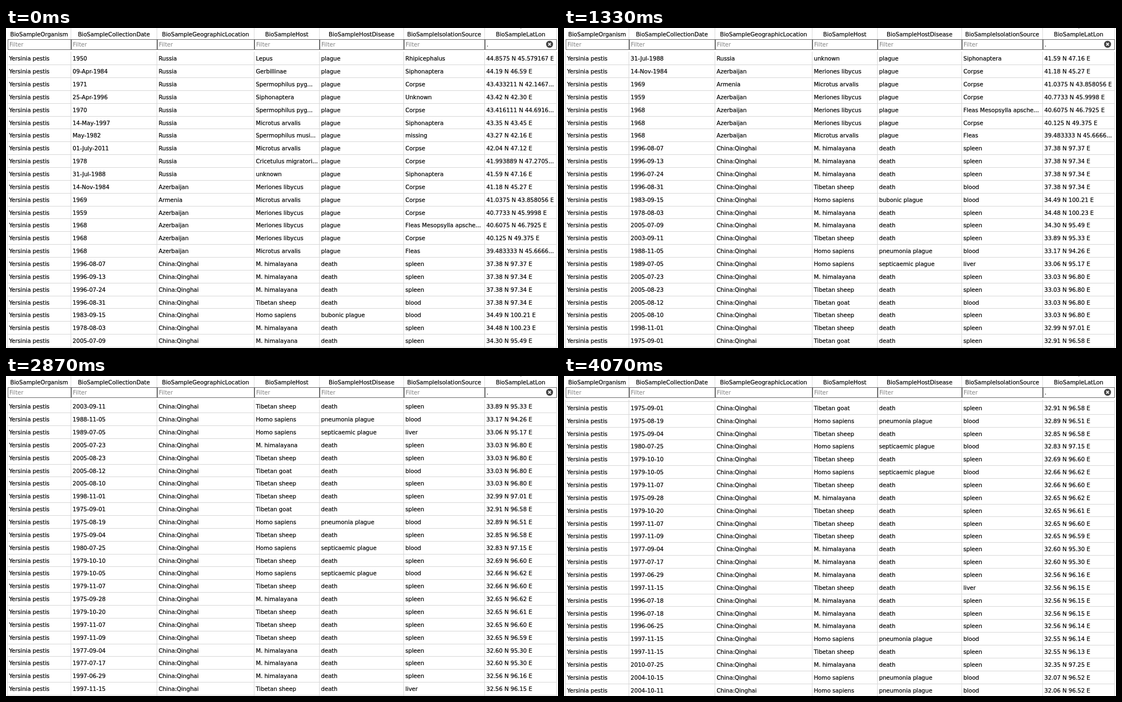
Write an HTML page that moves like this. It is 982 by 570 pixels and loops after 4.27 s.

```html
<!DOCTYPE html>
<html lang="en">
<head>
<meta charset="utf-8">
<title>Sample table</title>
<style>
  html, body { margin: 0; width: 100%; height: 100%; overflow: hidden; background: #fff; }
  body { position: relative; color: #000; white-space: pre; -webkit-text-stroke: 0.2px;
    font: 11.25px "DejaVu Sans Condensed", "Noto Sans", sans-serif; }
  div, span, svg { position: absolute; box-sizing: border-box; }
  .head { top: 0; height: 20px; line-height: 24px; text-align: center; border-right: 1px solid #dcdcdc; }
  .filter { top: 20px; height: 19px; line-height: 18px; padding-left: 2px; color: #808080;
    border: 1px solid #6e6e6e; -webkit-text-stroke: 0; }
  .filter.used { color: #000; }
  .rule { top: 42px; bottom: 0; width: 1px; background: #d8d8d8; }
  #list { top: 43px; left: 0; width: 982px; bottom: 0; overflow: hidden; }
  .row { left: 3px; width: 977px; height: 22.857px; line-height: 23px; border-bottom: 1px solid #d8d8d8; }
</style>
</head>
<body>
<div id="list"></div>
<svg width="982" height="40" style="left:0;top:0">
  <path d="M913 -2l3 3 3-3" fill="none" stroke="#999"/>
  <circle cx="967" cy="29" r="6.2" fill="#444"/>
  <path d="M964.7 26.7l4.6 4.6m0-4.6l-4.6 4.6" stroke="#fff" stroke-width="1.7"/>
</svg>
<script>
const LOOP = 4270, PITCH = 22.857;
const edges = [2, 115, 268, 441, 557, 707, 851, 979];
const titles = ['Organism', 'CollectionDate', 'GeographicLocation', 'Host', 'HostDisease', 'IsolationSource', 'LatLon'];

const western = `1950|Russia|Lepus|Rhipicephalus|44.8575 N 45.579167 E
09-Apr-1984|Russia|Gerbillinae|Siphonaptera|44.19 N 46.59 E
1971|Russia|Spermophilus pyg...|Corpse|43.433211 N 42.1467...
25-Apr-1996|Russia|Siphonaptera|Unknown|43.42 N 42.30 E
1970|Russia|Spermophilus pyg...|Corpse|43.416111 N 44.6916...
14-May-1997|Russia|Microtus arvalis|Siphonaptera|43.35 N 43.45 E
May-1982|Russia|Spermophilus musi...|missing|43.27 N 42.16 E
01-July-2011|Russia|Microtus arvalis|Corpse|42.04 N 47.12 E
1978|Russia|Cricetulus migratori...|Corpse|41.993889 N 47.2705...
31-Jul-1988|Russia|unknown|Siphonaptera|41.59 N 47.16 E
14-Nov-1984|Azerbaijan|Meriones libycus|Corpse|41.18 N 45.27 E
1969|Armenia|Microtus arvalis|Corpse|41.0375 N 43.858056 E
1959|Azerbaijan|Meriones libycus|Corpse|40.7733 N 45.9998 E
1968|Azerbaijan|Meriones libycus|Fleas Mesopsylla apsche...|40.6075 N 46.7925 E
1968|Azerbaijan|Meriones libycus|Corpse|40.125 N 49.375 E
1968|Azerbaijan|Microtus arvalis|Fleas|39.483333 N 45.6666...`;

// date, host + disease + tissue codes, latitude, longitude
const qinghai = `1996-08-07 Mds 37.38 97.37
1996-09-13 Mds 37.38 97.34
1996-07-24 Mds 37.38 97.34
1996-08-31 Sdb 37.38 97.34
1983-09-15 Hbb 34.49 100.21
1978-08-03 Mds 34.48 100.23
2005-07-09 Mds 34.30 95.49
2003-09-11 Sds 33.89 95.33
1988-11-05 Hpb 33.17 94.26
1989-07-05 Hsl 33.06 95.17
2005-07-23 Mds 33.03 96.80
2005-08-23 Sds 33.03 96.80
2005-08-12 Gdb 33.03 96.80
2005-08-10 Sds 33.03 96.80
1998-11-01 Sds 32.99 97.01
1975-09-01 Gds 32.91 96.58
1975-08-19 Hpb 32.89 96.51
1975-09-04 Sds 32.85 96.58
1980-07-25 Hsb 32.83 97.15
1979-10-10 Sds 32.69 96.60
1979-10-05 Hsb 32.66 96.62
1979-11-07 Sds 32.66 96.60
1975-09-28 Mds 32.65 96.62
1979-10-20 Sds 32.65 96.61
1997-11-07 Sds 32.65 96.60
1997-11-09 Sds 32.65 96.59
1977-09-04 Mds 32.60 95.30
1977-07-17 Mds 32.60 95.30
1997-06-29 Mds 32.56 96.16
1997-11-15 Sdl 32.56 96.15
1996-07-18 Mds 32.56 96.15
1996-07-18 Mds 32.56 96.15
1996-06-25 Mds 32.56 96.14
1997-11-15 Hpb 32.55 96.14
1997-11-15 Sds 32.55 96.13
2010-07-25 Mds 32.35 97.25
2004-10-15 Hpb 32.07 96.52
2004-10-11 Hpb 32.06 96.52`;

const hosts = { M: 'M. himalayana', S: 'Tibetan sheep', G: 'Tibetan goat', H: 'Homo sapiens' };
const diseases = { d: 'death', b: 'bubonic plague', p: 'pneumonia plague', s: 'septicaemic plague' };
const tissues = { s: 'spleen', b: 'blood', l: 'liver' };

const rows = [
  ...western.split('\n').map(line => {
    const [date, place, host, source, position] = line.split('|');
    return [date, place, host, 'plague', source, position];
  }),
  ...qinghai.split('\n').map(line => {
    const [date, [host, disease, tissue], lat, lon] = line.split(' ');
    return [date, 'China:Qinghai', hosts[host], diseases[disease], tissues[tissue], `${lat} N ${lon} E`];
  })
].map(cells => ['Yersinia pestis', ...cells]);

// [time, first visible row]; the last stop is the end of the scroll range
const stops = [[0, 0], [470, 1], [530, 2], [730, 3], [870, 4], [930, 5], [1070, 6], [1130, 7],
  [1270, 8], [1330, 9], [1470, 10], [1530, 11], [1670, 13], [1730, 14], [1870, 15], [1930, 16],
  [2130, 17], [2270, 18], [2400, 19], [2530, 20], [2670, 21], [2800, 22], [2870, 23], [3070, 24],
  [3200, 25], [3330, 26], [3470, 28], [3600, 29], [3870, 30], [4070, 31]];
const END_GAP = 2.5;

const list = document.getElementById('list');

function add(cls, left, width, text = '') {
  const el = document.createElement('div');
  el.className = cls;
  el.style.left = left + 'px';
  if (width) el.style.width = width + 'px';
  el.textContent = text;
  list.before(el);
}

titles.forEach((title, i) => {
  const left = edges[i], width = edges[i + 1] - left, last = i === titles.length - 1;
  add('head', left + 1, width, 'BioSample' + title);
  add(last ? 'filter used' : 'filter', left + 1, width, last ? '.' : 'Filter');
});
edges.forEach(x => add('rule', x, 0));

function show(first) {
  const shift = 0.3 + (first === 31 ? END_GAP : 0);
  let html = '';
  for (let i = -1; i < 23; i++) {
    const cells = (rows[first + i] || []).map((text, c) =>
      `<span style="left:${edges[c] + 0.5}px">${text}</span>`).join('');
    html += `<div class="row" style="top:${i * PITCH + shift}px">${cells}</div>`;
  }
  list.innerHTML = html;
}

let shown = -1;
function tick() {
  const t = performance.now() % LOOP;
  const first = stops.findLast(([time]) => time <= t)[1];
  if (first !== shown) show(shown = first);
  requestAnimationFrame(tick);
}
tick();
</script>
</body>
</html>
```
